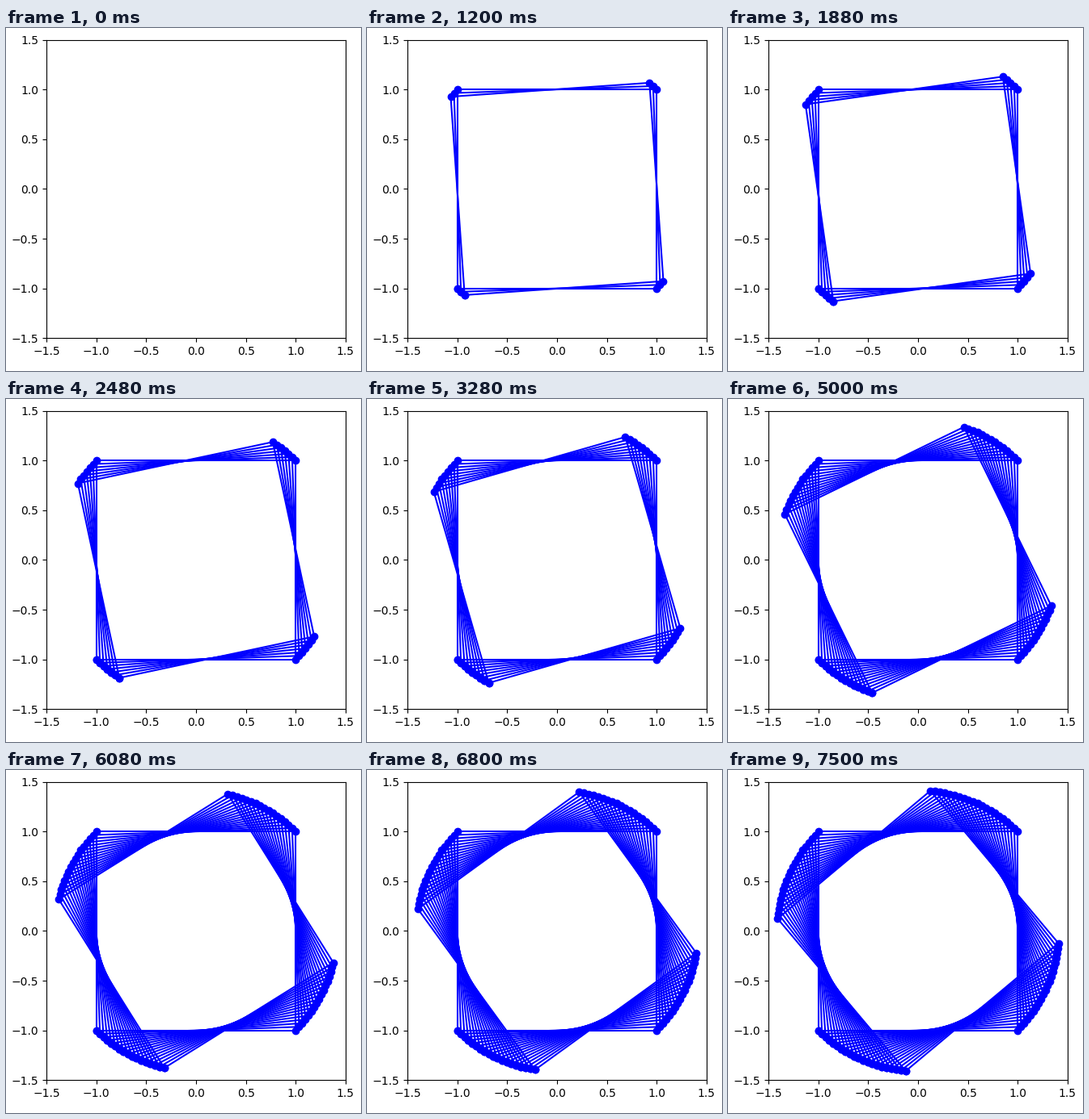
A matplotlib script that plays this animation: 439 px wide and 425 px high, repeating every 8000 ms.

```python
import matplotlib.pyplot as plt
import numpy as np
from matplotlib.animation import FuncAnimation

W, H, DPI = 439, 425, 100
LOOP, STEP = 8000, 40
COUNT = 21
TURN = np.radians(2)


def square(angle):
    """Closed square outline, turned by angle, starting at the lower left."""
    a = angle + np.pi / 4 + np.arange(2, 7) * np.pi / 2
    return np.sqrt(2) * np.cos(a), np.sqrt(2) * np.sin(a)


def start(k):
    """Time in ms at which square k appears: a 351 ms pace on a 100 ms beat."""
    return (490 + 351 * k) // 100 * 100 - 20


# The tiny margin keeps the pixel size from being truncated
fig = plt.figure(figsize=((W + 1e-6) / DPI, (H + 1e-6) / DPI), dpi=DPI)
ax = fig.add_axes([50.2 / W, 40.8 / H, 369.6 / W, 369.6 / H])
ax.set(xlim=(-1.5, 1.5), ylim=(-1.5, 1.5))
ticks = np.linspace(-1.5, 1.5, 7)
ax.set_xticks(ticks)
ax.set_yticks(ticks)

squares = [ax.plot(*square(k * TURN), "bo-", visible=False)[0]
           for k in range(COUNT)]


def update(i):
    now = i * STEP + STEP // 2
    for k, line in enumerate(squares):
        line.set_visible(start(k) <= now)
    return squares


anim = FuncAnimation(fig, update, frames=LOOP // STEP, interval=STEP,
                     repeat=True, repeat_delay=0)
plt.show()
```
